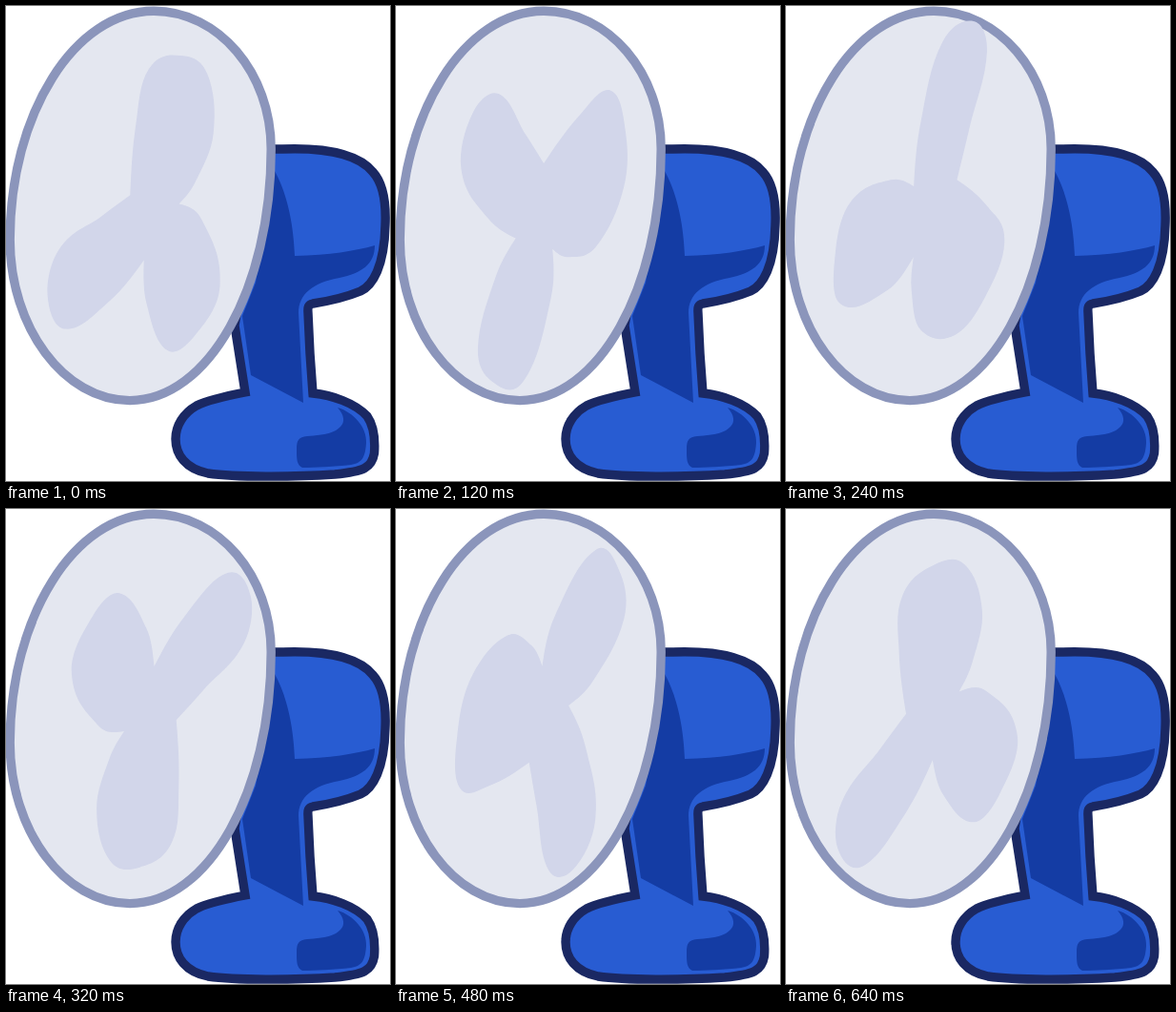
Write an HTML page that moves like this. It is 403 px wide and 498 px high and loops after 680 ms.

```html
<!DOCTYPE html>
<html lang="en">
<head>
<meta charset="utf-8">
<title>Desk fan</title>
<style>
  html, body { margin: 0; width: 100%; height: 100%; overflow: hidden; background: #fff; }
  svg { display: block; width: 100vw; height: 100vh; }
</style>
</head>
<body>
<svg viewBox="0 0 403 498">
  <path fill="#285cd2" stroke="#1a2863" stroke-width="9.4" d="M270 150H290C345 148 372 158 385 174C396 186 399 208 398 230C397 273 385 293 372 299C355 306 335 310 322 312C317 313 316.5 316 317 322C318 350 320 382 322 406C342 408 366 416 379 430C386 440 387.5 455 386.5 469C384 484 376 488 345 491C300 494 240 494 212 490C188 485 178 470 178 454C178 440 186 427 200 419C212 413 230 409 251 405L240 335Z"/>
  <g fill="#143ca4">
    <path d="M282 173C297 200 302 235 303 262C340 261 366 257 387 251C387 271 373 280 350 285C322 290 307 302 307 322L312 416L257 387L248 325L262 290Z"/>
    <path d="M348 421C365 426 379 442 378 458C377 473 374 479 362 481C345 483 325 484 311 484C305 481 305 475 305 465C305 455 307 452 316 451C335 450 346 447 351 441C356 436 355 429 348 421Z"/>
  </g>
  <path fill="#e4e7f0" stroke="#8b95bb" stroke-width="9.4" d="M155 5.3C223 5.3 278.2 70 278.2 150C278.2 297 212 413.6 130 413.6C61 413.6 4.2 337 4.2 245C4.2 113 72 5.3 155 5.3Z"/>
  <!-- the tilted plane in which the rotor spins -->
  <g transform="matrix(.608 -.157 -.107 1.106 153 215)">
    <path id="rotor" fill="#d2d6ea"/>
  </g>
</svg>
<script>
const STEP = 40, STEPS = 17, TURN = 2 * Math.PI;
const rotor = document.getElementById('rotor');

// Each blade: its notch at the hub, then its rim, as [degrees, radius].
const blades = [
  [[207, 46], [244, 98], [258, 142], [280, 146], [302, 141], [328, 113], [346, 75]],
  [[0, 47], [13, 92], [34, 161], [54, 164], [70, 148], [86, 88]],
  [[97, 46], [127, 95], [145, 162], [162, 179], [175, 158], [185, 88]]
];

const toXY = ([deg, r]) => {
  const a = deg * TURN / 360;
  return [r * Math.cos(a), r * Math.sin(a)];
};
const mid = (p, q) => [(p[0] + q[0]) / 2, (p[1] + q[1]) / 2];
const dist = (p, q) => Math.hypot(q[0] - p[0], q[1] - p[1]);
const fmt = p => p.map(v => v.toFixed(2)).join(' ');

// Control point beside p, parallel to the line a-b, reaching towards q.
function handle(p, a, b, q) {
  const s = 0.36 * dist(p, q) / dist(a, b);
  return [p[0] + (b[0] - a[0]) * s, p[1] + (b[1] - a[1]) * s];
}

// Smooth curve through the points, with corners only at both ends.
function curve(pts) {
  const last = pts.length - 1;
  let d = '';
  for (let i = 0; i < last; i++) {
    const [o, p, q, r] = [pts[i - 1], pts[i], pts[i + 1], pts[i + 2]];
    let c1 = o && handle(p, o, q, q);
    const c2 = r ? handle(q, r, p, p) : mid(q, c1);
    c1 = c1 || mid(p, c2);
    d += `C${fmt(c1)} ${fmt(c2)} ${fmt(q)}`;
  }
  return d;
}

const rims = blades.map((blade, i) =>
  curve([...blade, blades[(i + 1) % blades.length][0]].map(toXY)));
rotor.setAttribute('d', 'M' + fmt(toXY(blades[0][0])) + rims.join('') + 'Z');

// One clockwise turn per loop, slightly slower at first and then faster.
function draw(ms) {
  const u = Math.floor(ms / STEP) % STEPS / STEPS;
  const angle = 360 * u - 7 * Math.sin(TURN * u);
  rotor.setAttribute('transform', `rotate(${angle.toFixed(2)})`);
}

const start = performance.now();
function tick(now) {
  draw(Math.max(0, now - start));
  requestAnimationFrame(tick);
}
draw(0);
requestAnimationFrame(tick);
</script>
</body>
</html>
```
